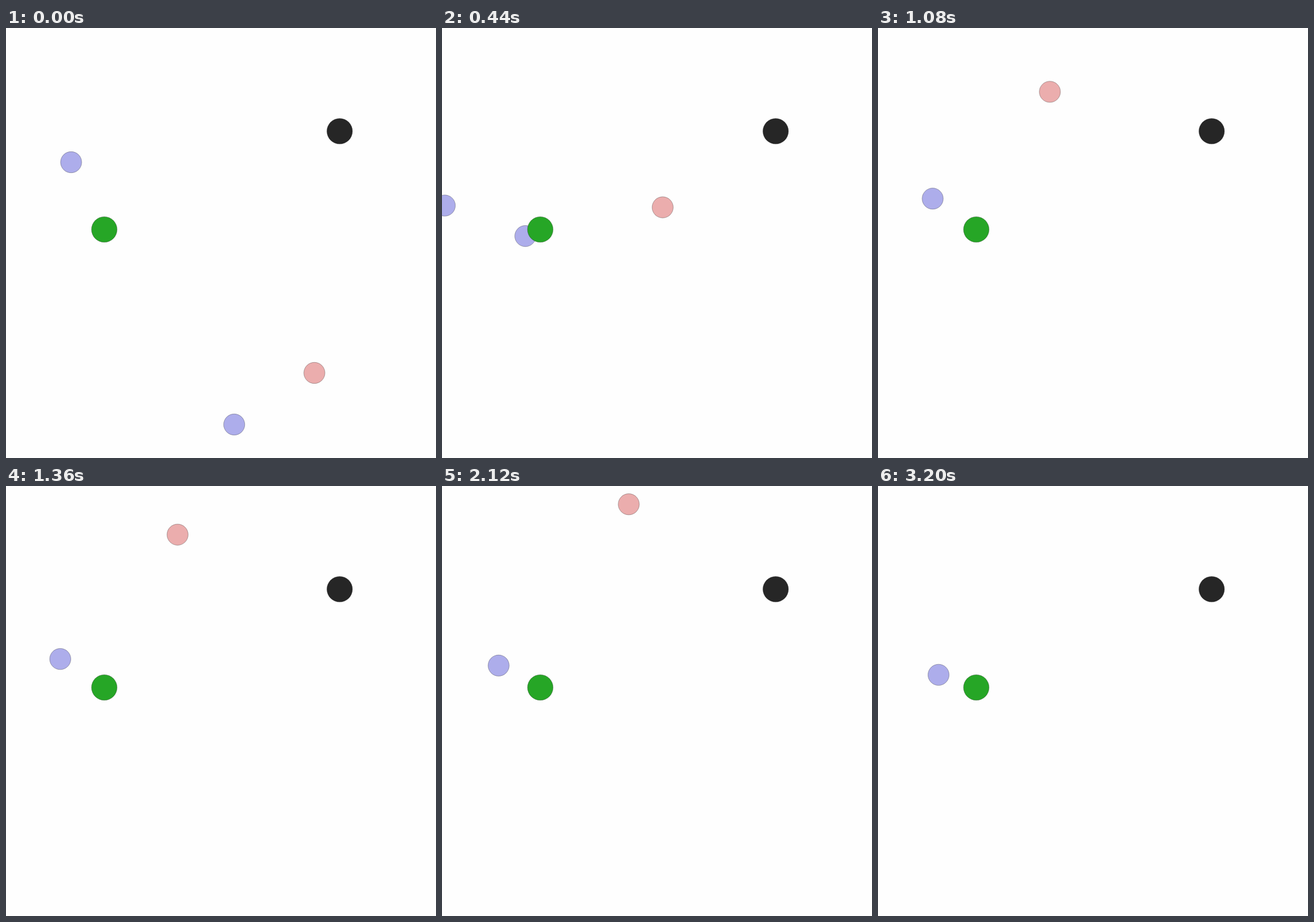
These frames come from a looping animation (700 px wide and 700 px high, 3.24 s). An HTML page with a canvas:

```html
<!DOCTYPE html>
<html lang="en">
<head>
<meta charset="utf-8">
<title>Drifting balls</title>
<style>
html, body { margin: 0; width: 100%; height: 100%; overflow: hidden; background: #fefefe; }
canvas { display: block; }
</style>
</head>
<body>
<canvas id="stage" width="700" height="700"></canvas>
<script>
const ctx = document.getElementById('stage').getContext('2d');
const STEP = 40, STEPS = 81;
const BLUE = '#adadeb', RED = '#ebadad';

// Each ball closes in on an anchor that drifts at a steady pace.
// brake: when and how softly it slows; turn: angle swung, and when.
const movers = [
  { fill: BLUE, from: [106, 218.5], anchor: [-40, 320], drift: [0, 0],
    brake: [1.6, 6], turn: [0, 0] },
  { fill: BLUE, from: [371.5, 645.5], anchor: [79.6, 262.6], drift: [.237, .56],
    brake: [.92, 4.6], turn: [-.9, 20] },
  { fill: RED, from: [502, 561.5], anchor: [219.5, 157.3], drift: [1.59, -2.41],
    brake: [5.44, 6.2], turn: [-.37, 14] }
];

const sigmoid = x => 1 / (1 + Math.exp(-x));

function place({ from, anchor, drift, brake, turn }, n) {
  const dx = from[0] - anchor[0], dy = from[1] - anchor[1];
  const [mid, soft] = brake;
  const gap = Math.hypot(dx, dy) * sigmoid((mid - n) / soft) / sigmoid(mid / soft);
  const angle = Math.atan2(dy, dx) + turn[0] * sigmoid((n - turn[1]) / 1.4);
  return [
    anchor[0] + drift[0] * n + gap * Math.cos(angle),
    anchor[1] + drift[1] * n + gap * Math.sin(angle)
  ];
}

function ball(x, y, r, fill) {
  ctx.beginPath();
  ctx.arc(x, y, r, 0, 2 * Math.PI);
  ctx.fillStyle = fill;
  ctx.fill();
  ctx.strokeStyle = 'rgba(0, 0, 0, .35)';
  ctx.lineWidth = .8;
  ctx.stroke();
}

function draw(time) {
  const n = Math.floor(time / STEP) % STEPS;
  ctx.fillStyle = '#fefefe';
  ctx.fillRect(0, 0, 700, 700);
  for (const m of movers) ball(...place(m, n), 17.2, m.fill);
  ball(160, 328, 20.8, '#26a626');
  ball(543.2, 168, 20.8, '#262626');
}

const start = performance.now();
function loop() {
  draw(performance.now() - start);
  requestAnimationFrame(loop);
}
loop();
</script>
</body>
</html>
```
